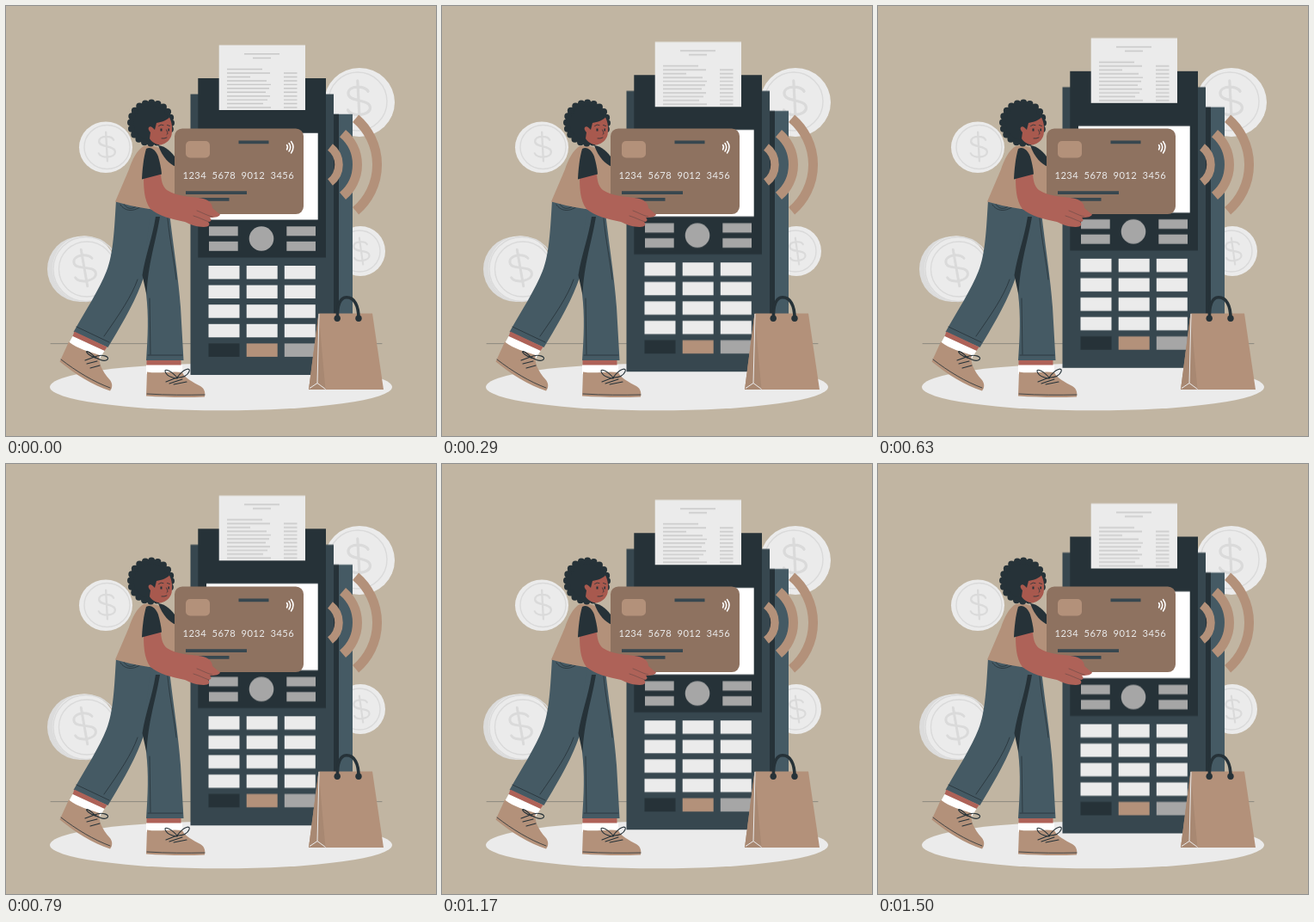
Animation of 500 by 500 pixels, one loop 1.54 s. Source, as an HTML page:

```html
<!DOCTYPE html>
<html lang="en">
<head>
<meta charset="utf-8">
<title>Contactless payment</title>
<style>
  html, body { margin: 0; width: 100%; height: 100%; overflow: hidden; background: #c1b5a2; }
  svg { display: block; width: 100%; height: 100%; }
  .tan { fill: #b3917a; }
  .ink { fill: #263238; }
  .steel { fill: #37474f; }
  .denim { fill: #455a64; }
  .pale { fill: #ebebeb; }
  .grey { fill: #a6a6a6; }
  .skin { fill: #ae6258; }
  .line { fill: none; stroke: #263238; stroke-width: .8; stroke-linecap: round; stroke-linejoin: round; }
  .lace { stroke-width: 1.1; }
  .ring { fill: none; stroke: #dadada; stroke-width: 1.4; }
  .dollar { fill: none; stroke: #dadada; stroke-width: 2.2; stroke-linecap: round; }
  .print { fill: none; stroke: #c8c8c8; stroke-width: 1.4; }
  .wave { fill: none; stroke: #b3917a; stroke-width: 11; }
  .digits { font: 400 11.2px Lato, sans-serif; letter-spacing: .4px; word-spacing: 3.2px; fill: #ebebeb; }
  #terminal { animation: float 1540ms linear -40ms infinite; }
  @keyframes float {
    0%, 100% { transform: translateY(.5px); }
    50% { transform: translateY(-9.5px); }
  }
</style>
</head>
<body>
<svg viewBox="0 0 500 500">
  <defs>
    <path id="dollar" d="M8-7C6-12-8-13-8-6C-8 1 9-1 9 6C9 13-7 13-9 7M0-16V16"/>
    <g id="keys">
      <rect x="235.5" width="36" height="15.5"/>
      <rect x="279.7" width="36" height="15.5"/>
      <rect x="323.8" width="36" height="15.5"/>
    </g>
    <g id="pads">
      <rect x="236" width="33.7" height="11"/>
      <rect x="326.3" width="33.7" height="11"/>
    </g>
  </defs>

  <rect width="500" height="500" fill="#c1b5a2"/>
  <ellipse class="pale" cx="250" cy="443" rx="199" ry="27.3"/>
  <path class="line" d="M52 392.6H437" style="stroke-width:.5" opacity=".65"/>

  <g id="coins">
    <ellipse class="pale" cx="116" cy="164.3" rx="31" ry="29.7"/>
    <ellipse class="ring" cx="117.5" cy="164" rx="26.5" ry="25.5"/>
    <use href="#dollar" class="dollar" transform="translate(117 163.5) rotate(-3) scale(1.06)"/>

    <ellipse cx="86" cy="306" rx="38" ry="38" fill="#dcdcdc"/>
    <ellipse class="pale" cx="91" cy="305.5" rx="37" ry="38.2"/>
    <ellipse class="ring" cx="93" cy="306" rx="38" ry="37.5"/>
    <ellipse class="ring" cx="94" cy="306" rx="32.5" ry="32"/>
    <use href="#dollar" class="dollar" transform="translate(91 304.5) rotate(-10) scale(1.35)"/>

    <ellipse class="pale" cx="411" cy="112" rx="41" ry="40"/>
    <ellipse class="ring" cx="409" cy="111" rx="34" ry="34"/>
    <use href="#dollar" class="dollar" transform="translate(410 110) rotate(-3) scale(1.45)"/>

    <ellipse class="pale" cx="412" cy="285" rx="29" ry="29"/>
    <ellipse class="ring" cx="411" cy="285" rx="24" ry="24"/>
    <use href="#dollar" class="dollar" transform="translate(413 285) rotate(-8) scale(.98)"/>
  </g>

  <g id="terminal">
    <path class="denim" d="M380 125.8H403V420H380Z"/>
    <path class="ink" d="M380 125.8H387V420H380Z"/>
    <path class="steel" d="M214.5 102.4H381V429H214.5Z"/>
    <path class="ink" d="M223.3 84H372V292.5H223.3Z"/>
    <path class="pale" d="M247.7 45.4H348V121H247.7Z"/>
    <path class="print" d="M277 55.7H318M287 60.5H308M257 73.5H298M257 78H307M257 82.5H284M257 87H303M257 91.4H308M257 95.8H306M257 100.2H302M257 104.7H307M257 109.1H304M257 113.5H299M257 118H308"/>
    <path class="print" d="M323 78H338.5M323 82.5H338.5M323 87H338.5M323 91.4H338.5M323 95.8H338.5M323 100.2H338.5M323 104.7H338.5M323 109.1H338.5M323 113.5H338.5M323 118H338.5"/>
    <path fill="#fff" d="M233 147.8H362.7V248.5H233Z"/>
    <g class="grey">
      <use href="#pads" y="256.3"/>
      <use href="#pads" y="273.8"/>
      <circle cx="297" cy="270.5" r="14.3"/>
    </g>
    <g class="pale">
      <use href="#keys" y="302"/>
      <use href="#keys" y="324.6"/>
      <use href="#keys" y="347.2"/>
      <use href="#keys" y="369.8"/>
    </g>
    <rect class="ink" x="235.5" y="392.4" width="36" height="15.5"/>
    <rect class="tan" x="279.7" y="392.4" width="36" height="15.5"/>
    <rect class="grey" x="323.8" y="392.4" width="36" height="15.5"/>
  </g>

  <g transform="translate(361 184.5)">
    <path class="wave" d="M16-20.5A26 26 0 0 1 16 20.5" style="stroke-width:9.5"/>
    <path class="wave" d="M30.5-36.4A47.5 47.5 0 0 1 30.5 36.4"/>
    <path class="wave" d="M45.6-53.8A70.5 70.5 0 0 1 45.6 53.8"/>
  </g>

  <g id="shopper">
    <!-- trousers -->
    <path class="denim" d="M128 226L176 238C176 264 167 300 157 324C147 350 131 376 118.5 397L78.5 379C92 355 109 329 117 308C125 288 126 258 128 226Z"/>
    <path class="denim" d="M168 240H190C194 275 201 320 203 350L206.5 412H163C165 385 166 360 163 335C160 300 164 270 168 240Z"/>
    <path class="ink" d="M174 245C170 270 162 290 158.5 313L163.5 336C165 300 174 275 179 245Z"/>
    <path class="line" d="M133 231C138 239 149 240 158 232M137 230C140 236 146 237 151 233M167 340L168 405M82 373L120 391M165 406H205M114 384C132 358 146 338 153 318M188 247C190 270 196 300 198 318"/>
    <!-- ankles, socks -->
    <path class="skin" d="M79.5 378.5L117.5 396.5L114.5 401L77.5 384Z"/>
    <path fill="#fff" d="M77.5 384L114.5 401L109 410L72 394Z"/>
    <path class="skin" d="M163.5 412H203.5V418H163.5Z"/>
    <path fill="#fff" d="M163 417.5H205V428H163Z"/>
    <!-- shoes -->
    <path class="tan" d="M73 390.5C84 399 97 402 109 406C107 414 111 424 121 435C124 439 124 444 121 447.5C101 441 80 428 62.5 413.5Z"/>
    <path class="tan" d="M164 425.5C178 428 192 424 205 426C208 433 217 437 226 442C231 445 232 450 231 454.5C208 455.5 185 455 163 453.5Z"/>
    <path class="line" d="M64 411C82 425 102 437 121 444M164 451C188 452.5 210 452.5 231 452"/>
    <path class="line lace" d="M92 412L103 408C94 399 91 401 96 405S110 411 103 408C112 404 121 408 118 411S108 411 103 408M94 416L106 413M98 421L109 418M186 437L199 432C190 422 182 421 186 427S203 434 199 432C207 421 215 420 213 425S205 432 199 432M190 439L205 434M195 440L210 437"/>
    <!-- vest and far sleeve -->
    <path class="tan" d="M160 163C171 160 186 166 196 180V238C174 238 150 234 127 227.5L143 190C147 178 152 168 160 163Z"/>
    <path class="ink" d="M177 162C186 163 193 170 198 178V187C190 184 182 176 177 162Z"/>
  </g>

  <g id="card">
    <rect x="196" y="142.4" width="150" height="99.7" rx="9" fill="#8e7260"/>
    <rect class="tan" x="209" y="157" width="28" height="19.5" rx="5"/>
    <path class="steel" d="M270.5 156.5H305.5V160.2H270.5ZM209 215.3H280V219H209ZM209 223H259.5V226.7H209Z"/>
    <text class="digits" x="205.5" y="201.3">1234 5678 9012 3456</text>
    <path fill="none" stroke="#fff" stroke-width="1.5" stroke-linecap="round" d="M326.5 161.5Q328.5 164 326.5 167M329 159.5Q332.5 164 329 169M331.5 157.5Q336.5 164 331.5 171"/>
  </g>

  <g id="arm">
    <path class="skin" d="M160 196L180 193C180 202 182 210 187 214C199 222 213 221 227 223.5C236 225 240 230 240 235L249 242.5C247 246 241 246 237 246C240 249 238 251 235 251C238 254 236 257 230 257C222 257 214 254 208 251C193 248 177 244 168 236C160 226 160 209 160 196Z"/>
    <path class="line" d="M222 238C228 240 232 243 240 245M218 244C225 246 230 249 236 251" opacity=".4"/>
    <path class="ink" d="M163 166C169 163 174 168 177 175C179 182 180.500 189 181 195.500L158 201.500C158.500 190 160 176 163 166Z"/>
  </g>

  <g id="head">
    <circle class="ink" cx="168.5" cy="136" r="24.5"/>
    <circle cx="168.5" cy="136" r="23.5" fill="none" stroke="#263238" stroke-width="8" stroke-linecap="round" stroke-dasharray="0 7.383"/>
    <path fill="#a8594e" d="M168 147C163 142 167 138 171 142L173 144L175 136C181 135 187 133 190 129.5C193 135 194 143 192.5 150C191 156 186 160 180 161.5C174 161 169 158 167 154Z"/>
    <path class="line" d="M177.500 139.500Q180 137 183 138.500M187.500 138.500L190.500 139.500M186.500 144C187.500 147 189 148 187 149.500M181 154Q184 154.500 187 153"/>
    <path class="ink" d="M179.500 142.500H181.500V145.500H179.500ZM188.500 142.500H190V145.500H188.500Z"/>
  </g>

  <g id="bag">
    <path class="tan" d="M363.5 357.5H426L439 446H352Z"/>
    <path fill="#a88872" d="M363.5 357.5L371.5 446H352Z"/>
    <path fill="none" stroke="#ebebeb" d="M364 358L362 438.5L353 444.5M362 438.5L371.5 445.5"/>
    <path fill="none" stroke="#263238" stroke-width="3.6" d="M385.5 363C385 349 388 338.800 396 338.800C405 338.800 410 348 410 363"/>
    <circle class="ink" cx="385.2" cy="363.2" r="3.7"/>
    <circle class="ink" cx="410" cy="363.2" r="3.7"/>
  </g>
</svg>
</body>
</html>
```
